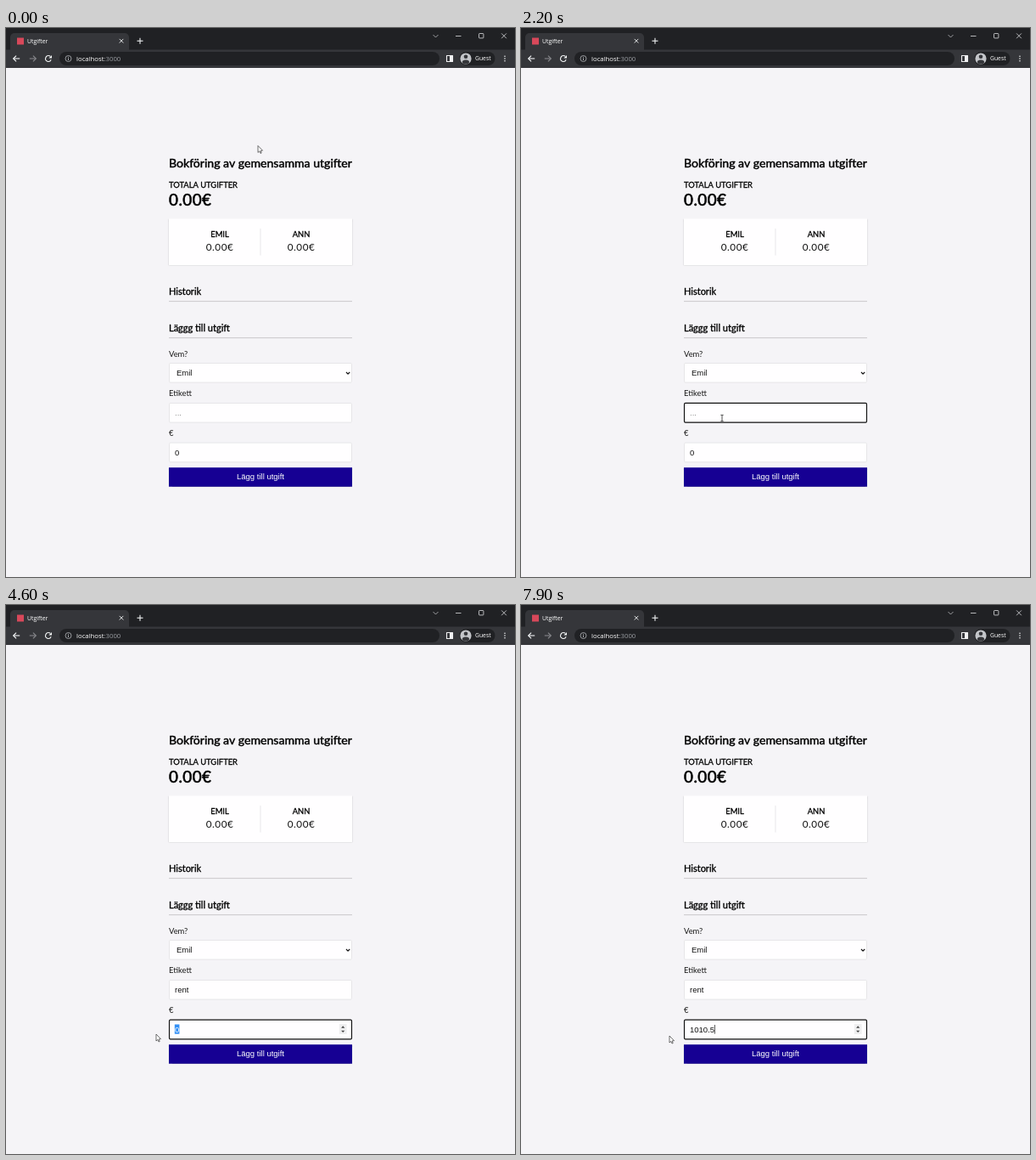
Animation, 600 px wide and 646 px high, one loop 8000 ms. Source, as an HTML page with a canvas:

```html
<!DOCTYPE html>
<html lang="sv">
<head>
<meta charset="utf-8">
<title>Utgifter</title>
<style>
html, body { margin: 0; width: 100%; height: 100%; overflow: hidden; background: #f5f4f7; }
canvas { display: block; width: 600px; height: 646px; }
</style>
</head>
<body>
<canvas id="stage"></canvas>
<script>
const W = 600, H = 646, LOOP = 8000;
const canvas = document.getElementById('stage');
const dpr = window.devicePixelRatio || 1;
canvas.width = W * dpr;
canvas.height = H * dpr;
const c = canvas.getContext('2d');

const LATO = 'Lato, sans-serif';
const ARIAL = '"Liberation Sans", Arial, sans-serif';
const UI = '"Open Sans", "Noto Sans", sans-serif';
const LEFT = 192, RIGHT = 408, FIELD_H = 23.5;
const FIELD = { select: 394, label: 441, amount: 487.7 };

// Pointer stops: time, x, y
const PATH = [
  [0, 297, 138.5], [200, 297, 138.5], [1200, 244, 424], [1600, 237, 459],
  [3650, 237, 459], [4000, 218, 492], [4200, 212, 499], [4350, 212, 499],
  [4500, 194, 502], [4600, 177, 505], [5000, 175, 507]
];
const LABEL_KEYS = { text: 'rent', times: [2850, 3050, 3250, 3550] };
const AMOUNT_KEYS = { text: '1010.5', times: [5350, 5900, 6050, 6250, 6850, 7450] };
const FOCUS_LABEL = 1650, FOCUS_AMOUNT = 4250, SELECT_ZERO = 4420;

function pointer(t) {
  for (let i = 1; i < PATH.length; i++) {
    const [t0, x0, y0] = PATH[i - 1], [t1, x1, y1] = PATH[i];
    if (t < t1) {
      const u = (t - t0) / (t1 - t0), k = u * u * (3 - 2 * u);
      return [x0 + (x1 - x0) * k, y0 + (y1 - y0) * k];
    }
  }
  return PATH[PATH.length - 1].slice(1);
}

function typed(keys, t) {
  const n = keys.times.filter(k => k <= t).length;
  return keys.text.slice(0, n);
}

function caretOn(keys, focusTime, t) {
  const last = keys.times.reduce((a, k) => (k <= t ? k : a), focusTime);
  return Math.floor((t - last) / 500) % 2 === 0;
}

function rect(x, y, w, h, color) {
  c.fillStyle = color;
  c.fillRect(x, y, w, h);
}

function round(x, y, w, h, r, fill) {
  c.beginPath();
  c.roundRect(x, y, w, h, r);
  if (fill) { c.fillStyle = fill; c.fill(); }
}

function disc(x, y, r, color) {
  c.beginPath();
  c.arc(x, y, r, 0, Math.PI * 2);
  c.fillStyle = color;
  c.fill();
}

function line(points, color, width = 1) {
  c.beginPath();
  points.forEach(([x, y], i) => (i ? c.lineTo(x, y) : c.moveTo(x, y)));
  c.strokeStyle = color;
  c.lineWidth = width;
  c.stroke();
}

function polygon(points, color) {
  c.beginPath();
  points.forEach(([x, y]) => c.lineTo(x, y));
  c.closePath();
  c.fillStyle = color;
  c.fill();
}

function text(str, x, y, size, family, o = {}) {
  c.font = size + 'px ' + family;
  c.textAlign = o.align || 'left';
  c.letterSpacing = (o.spacing || 0) + 'px';
  c.fillStyle = o.color || '#000';
  c.fillText(str, x, y);
  if (o.bold) {
    // synthetic bold keeps the regular advance widths
    c.strokeStyle = c.fillStyle;
    c.lineWidth = size / 32;
    c.lineJoin = 'round';
    c.strokeText(str, x, y);
  }
  c.letterSpacing = '0px';
}

function cross(x, y, r, color, width) {
  line([[x - r, y - r], [x + r, y + r]], color, width);
  line([[x + r, y - r], [x - r, y + r]], color, width);
}

function arrow(x, y, dir, color) {
  line([[x - 3.7, y], [x + 3.7, y]], color, 1.1);
  line([[x + dir * 0.4, y - 3.4], [x + dir * 3.8, y], [x + dir * 0.4, y + 3.4]], color, 1.1);
}

function drawBrowser() {
  rect(0, 0, W, 26, '#202124');
  rect(0, 25.5, W, 21.5, '#35363a');
  round(5, 6, 140, 22, [5, 5, 0, 0], '#35363a');
  rect(13, 11.5, 8, 8, '#d8485a');
  text('Utgifter', 25, 17.8, 6.9, UI, { color: '#fff' });
  cross(136, 15.2, 2.3, '#f1f3f4', 0.9);
  line([[154.5, 15.2], [161.5, 15.2]], '#f1f3f4', 1.1);
  line([[158, 11.7], [158, 18.7]], '#f1f3f4', 1.1);

  line([[503.5, 8], [506.5, 11], [509.5, 8]], '#bdbec1', 0.8);
  line([[530, 9.5], [536.5, 9.5]], '#dcdde0', 0.8);
  c.strokeStyle = '#dcdde0';
  c.lineWidth = 0.8;
  round(557.5, 6.5, 5.4, 5.4, 0.7);
  c.stroke();
  cross(587, 9.3, 2.9, '#dcdde0', 0.8);

  arrow(12.5, 36, -1, '#f1f3f4');
  arrow(31.5, 36, 1, '#85868a');
  c.strokeStyle = '#f1f3f4';
  c.lineWidth = 1.1;
  c.beginPath();
  c.arc(50, 36, 3.4, 0.4, Math.PI * 1.72);
  c.stroke();
  polygon([[54, 32], [54, 35.6], [50.4, 35.6]], '#f1f3f4');

  round(63, 28, 448, 16, 8, '#202124');
  c.strokeStyle = '#b4b6ba';
  c.lineWidth = 0.8;
  c.beginPath();
  c.arc(73.5, 36, 3.5, 0, Math.PI * 2);
  c.stroke();
  rect(73.1, 35.4, 0.9, 2.6, '#b4b6ba');
  rect(73.1, 33.8, 0.9, 0.9, '#b4b6ba');
  text('localhost', 83, 38.8, 7.75, UI, { color: '#fff' });
  text(':3000', 83 + c.measureText('localhost').width, 38.8, 7.75, UI, { color: '#9da0a5' });

  c.strokeStyle = '#f1f1f3';
  c.lineWidth = 1.1;
  c.strokeRect(519.5, 32.5, 7, 7);
  rect(523, 32.5, 3.5, 7, '#f1f1f3');
  round(534.5, 28, 42, 16, 8, '#202124');
  c.save();
  disc(542, 36, 6.6, '#c3c5c9');
  c.clip();
  disc(542, 33.8, 2.3, '#35363a');
  c.beginPath();
  c.ellipse(542, 40, 4.1, 2.5, 0, 0, Math.PI * 2);
  c.fill();
  c.restore();
  text('Guest', 553, 38.4, 6.8, UI, { color: '#fff' });
  for (const y of [33.2, 36, 38.8]) disc(588, y, 0.8, '#f1f3f4');
}

function shadowBox(x, y, w, h, fill) {
  c.save();
  c.shadowColor = 'rgba(0,0,0,.3)';
  c.shadowBlur = 1.4 * dpr;
  c.shadowOffsetY = 0.6 * dpr;
  rect(x, y, w, h, fill);
  c.restore();
}

function drawSummary() {
  text('Bokföring av gemensamma utgifter', LEFT, 164.4, 14.08, LATO, { bold: true });
  text('TOTALA UTGIFTER', LEFT, 188.3, 9.4, LATO, { bold: true });
  text('0.00€', LEFT, 208.7, 18.8, LATO, { bold: true, spacing: 0.5 });

  shadowBox(LEFT, 224.2, RIGHT - LEFT, 55, '#fffeff');
  rect(299.6, 236, 0.7, 31.6, '#dedee0');
  [['EMIL', 252], ['ANN', 348]].forEach(([name, x]) => {
    text(name, x, 245.5, 9.4, LATO, { bold: true, align: 'center' });
    text('0.00€', x, 262.2, 11.7, LATO, { align: 'center', spacing: 0.55, color: '#111' });
  });

  [['Historik', 314], ['Läggg till utgift', 357]].forEach(([title, y]) => {
    text(title, LEFT, y, 11, LATO, { bold: true });
    rect(LEFT, y + 7.3, RIGHT - LEFT, 0.8, '#bfbec1');
  });
}

function field(y, focused) {
  round(LEFT + 0.5, y + 0.4, RIGHT - LEFT - 1, FIELD_H - 0.8, 1.3, '#fffeff');
  c.strokeStyle = focused ? '#101010' : '#dedee0';
  c.lineWidth = focused ? 1.15 : 0.7;
  c.stroke();
}

function value(str, y, color, caret) {
  text(str, 199, y + 14.9, 9.5, ARIAL, { color });
  if (caret) rect(199 + c.measureText(str).width - 0.1, y + 6.3, 0.7, 10.6, '#111');
}

function spinner(y) {
  rect(392.8, y + 5.3, 8.8, 12, '#efeff0');
  polygon([[395.1, y + 10], [399.3, y + 10], [397.2, y + 7.6]], '#444');
  polygon([[395.1, y + 13], [399.3, y + 13], [397.2, y + 15.4]], '#444');
}

const inside = (x, y, top) => x >= LEFT && x <= RIGHT && y >= top && y <= top + FIELD_H;

function drawForm(t, x, y) {
  const labelFocus = t >= FOCUS_LABEL && t < FOCUS_AMOUNT;
  const amountFocus = t >= FOCUS_AMOUNT;
  const label = typed(LABEL_KEYS, t), amount = typed(AMOUNT_KEYS, t);

  [['Vem?', 386.6], ['Etikett', 433.4], ['€', 480.2]].forEach(([name, base]) =>
    text(name, LEFT, base, 9.4, LATO, { color: '#181818' }));

  field(FIELD.select, false);
  text('Emil', 201, 409.4, 9.5, ARIAL, { color: '#111' });
  line([[401, 405], [403.1, 407.1], [405.2, 405]], '#111', 1.2);

  field(FIELD.label, labelFocus);
  const labelCaret = labelFocus && caretOn(LABEL_KEYS, FOCUS_LABEL, t);
  if (label) {
    value(label, FIELD.label, '#111', labelCaret);
  } else {
    value('...', FIELD.label, '#858585', false);
    if (labelCaret) value('', FIELD.label, '#111', true);
  }

  field(FIELD.amount, amountFocus);
  const selected = t >= SELECT_ZERO && !amount;
  if (selected) rect(198.8, FIELD.amount + 5.8, 5.6, 11.2, '#3390f5');
  value(amount || '0', FIELD.amount, selected ? '#fff' : '#111',
    amountFocus && !selected && caretOn(AMOUNT_KEYS, FOCUS_AMOUNT, t));
  if (amountFocus || inside(x, y, FIELD.amount)) spinner(FIELD.amount);

  shadowBox(LEFT, 517.2, RIGHT - LEFT, 22.5, '#160093');
  text('Lägg till utgift', 300, 531.3, 9.5, ARIAL, { align: 'center', color: '#fff' });
}

function drawPointer(x, y) {
  if (inside(x, y, FIELD.label) || inside(x, y, FIELD.amount)) {
    line([[x, y - 3.6], [x, y + 3.6]], '#222', 0.8);
    line([[x - 1.7, y - 3.6], [x + 1.7, y - 3.6]], '#222', 0.7);
    line([[x - 1.7, y + 3.6], [x + 1.7, y + 3.6]], '#222', 0.7);
    return;
  }
  const shape = [[0, 0], [0, 8], [1.8, 6.4], [3, 9], [4.2, 8.5], [3.1, 5.9], [5.5, 5.7]];
  polygon(shape.map(([dx, dy]) => [x + dx, y + dy]), '#fff');
  c.strokeStyle = '#333';
  c.lineWidth = 0.7;
  c.stroke();
}

function draw(t) {
  const [x, y] = pointer(t);
  c.setTransform(dpr, 0, 0, dpr, 0, 0);
  rect(0, 0, W, H, '#f5f4f7');
  drawBrowser();
  drawSummary();
  drawForm(t, x, y);
  drawPointer(x, y);
}

const start = performance.now();
function tick() {
  draw((performance.now() - start) % LOOP);
  requestAnimationFrame(tick);
}
tick();
</script>
</body>
</html>
```
